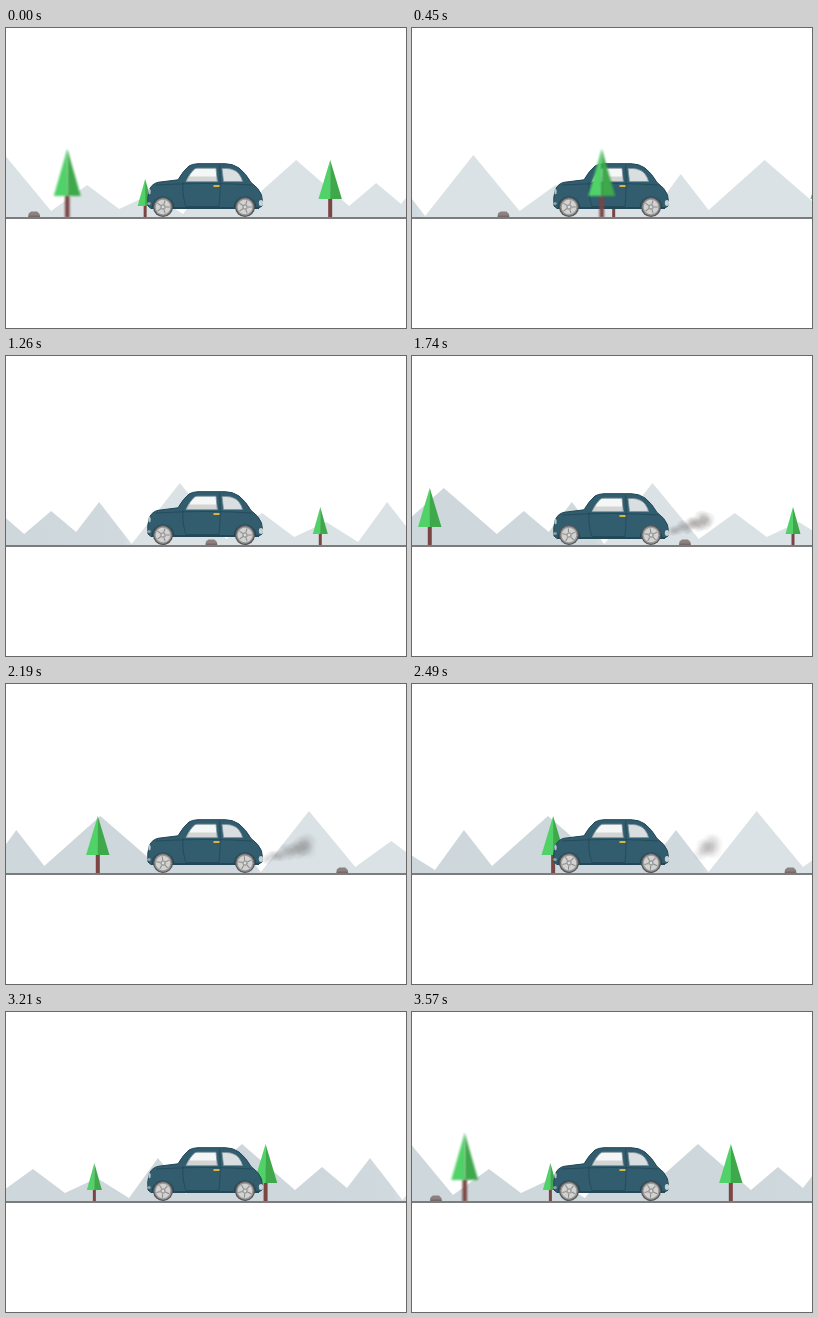
Write an HTML page with a canvas that moves like this. It is 400 px wide and 300 px high and loops after 3600 ms.

```html
<!DOCTYPE html>
<html lang="en">
<head>
<meta charset="utf-8">
<title>Little car on the road</title>
<style>
html, body { margin: 0; width: 100%; height: 100%; overflow: hidden; background: #fff; }
canvas { display: block; width: 400px; height: 300px; }
</style>
</head>
<body>
<canvas id="stage" width="400" height="300"></canvas>
<script>
const ctx = document.getElementById('stage').getContext('2d');
const LOOP = 3600, GROUND = 190, RANGE = 500;

// One repeating stretch of the mountain range
const ridge = [[-1.3, 127], [45, 183], [81, 157], [113, 181], [145, 166], [177, 186], [206, 146], [234, 182],
  [290, 132], [343, 178], [370, 155], [395, 176], [418, 146], [450.5, 188]];

const bodyShape = new Path2D(`M142 178 Q141 169 143 163 Q145 156 152 154.3 L172 151.8 Q177 143 183 138
  Q186 136 192 135.7 H219 Q227 135.7 233 140 Q240 145.5 245 154.5 Q253 160 255.5 167 Q257 173 256 178
  L252 180.5 H145 Z`);
const frontWindow = new Path2D('M180 153.5 Q184 145 188 141.5 Q189 140.3 192 140.2 H210 L211.3 153.5 Z');
const rearWindow = new Path2D('M216 140.5 H221 Q229 141 233 146 Q236 150 236.5 153.5 H217.5 Z');
const seams = new Path2D('M177 154 Q176 168 180 178.5 H213 Q215 160 213.5 137 M150 157 Q200 154 246 157');

function fill(shape, color) {
  ctx.fillStyle = color;
  ctx.fill(shape);
}

function polygon(color, ...points) {
  ctx.beginPath();
  points.forEach(([x, y]) => ctx.lineTo(x, y));
  ctx.fillStyle = color;
  ctx.fill();
}

function ellipse(x, y, rx, ry, color, start = 0, end = 2 * Math.PI) {
  ctx.beginPath();
  ctx.ellipse(x, y, rx, ry, 0, start, end);
  ctx.fillStyle = color;
  ctx.fill();
}

function mountains(t) {
  const shift = t / LOOP * RANGE;
  const shade = ctx.createLinearGradient(shift - 150, 0, shift - 20, 0);
  shade.addColorStop(0, '#ced7db');
  shade.addColorStop(0.7, '#d0d9dd');
  shade.addColorStop(0.8, '#dae2e6');
  const points = [-1, 0, 1].flatMap(i => ridge.map(([x, y]) => [x + i * RANGE + shift, y]));
  polygon(shade, [points[0][0], GROUND], ...points, [points.at(-1)[0], GROUND]);
}

function tree(x, top, base, half, trunk, blur) {
  ctx.filter = `blur(${blur}px)`;
  ctx.fillStyle = '#7a4543';
  ctx.fillRect(x - trunk / 2, base - 1, trunk, GROUND - base + 1);
  polygon('#50d268', [x, top], [x - half, base], [x + 0.5, base]);
  polygon('#3ea84b', [x, top], [x, base], [x + half, base]);
  ctx.filter = 'none';
}

function rock(x) {
  polygon('#8d807f', [x - 6, 189], [x - 5.5, 185.5], [x - 3, 183.5], [x + 3, 183.5], [x + 5.5, 186], [x + 6, 189]);
  ctx.fillStyle = '#75696a';
  ctx.fillRect(x - 5.5, 187.5, 11, 1.5);
}

function wheel(x, t) {
  ctx.save();
  ctx.translate(x, 179);
  ctx.rotate(-t / LOOP * 16 * Math.PI);
  ellipse(0, 0, 10, 10, '#56575a');
  ellipse(0, 0, 8.7, 8.7, '#979797');
  ellipse(0, 0, 7.3, 7.3, '#d2d2d0');
  ctx.strokeStyle = '#8a8a8a';
  ctx.lineWidth = 1;
  ctx.beginPath();
  for (let i = 0; i < 5; i++) {
    ctx.rotate(Math.PI * 0.4);
    ctx.moveTo(2.5, 0);
    ctx.lineTo(6.8, 0);
  }
  ctx.stroke();
  ellipse(0, 0, 2.7, 2.7, '#9c9c9c');
  ellipse(0, 0, 1.3, 1.3, '#dcdcdc');
  ctx.restore();
}

function car(t) {
  ctx.save();
  // The suspension sinks after the rock passes the rear wheel
  ctx.translate(0, 2 * Math.exp(-(((t - 1740) / 120) ** 2)));
  fill(bodyShape, '#315d6f');
  ctx.strokeStyle = '#234756';
  ctx.lineWidth = 1;
  ctx.stroke(bodyShape);
  ctx.lineWidth = 0.8;
  ctx.stroke(seams);
  ctx.fillStyle = '#234756';
  ctx.fillRect(146, 179, 107, 2);

  fill(frontWindow, '#f5f6f6');
  polygon('#d3d5d5', [180, 153.5], [182.5, 148.5], [210.8, 148.5], [211.3, 153.5]);
  fill(rearWindow, '#d9dee1');
  ctx.strokeStyle = '#7f939c';
  ctx.stroke(frontWindow);
  ctx.stroke(rearWindow);

  ctx.fillStyle = '#d8b53c';
  ctx.fillRect(207.5, 157, 6, 2);
  ellipse(143.5, 163.5, 1.2, 2.8, '#b9c4c6');
  ellipse(143, 175.5, 1.8, 1.5, '#8fa0a6');
  ellipse(255, 175, 2.2, 3, '#c9d2d5');
  ellipse(157, 180, 11.3, 11.5, '#234756', Math.PI);
  ellipse(239, 180, 11.3, 11.5, '#234756', Math.PI);
  ctx.restore();
  wheel(157, t);
  wheel(239, t);
}

function smoke(t) {
  for (let i = 0; i < 20; i++) {
    const age = (t - 1330 - i * 45) / 720;
    if (age <= 0 || age >= 1) continue;
    const travel = 1 - (1 - age) ** 2;
    const x = 260 + 43 * travel;
    const y = 175 - 14 * travel + 6 * Math.sin(i * 2.4) * Math.sqrt(age);
    const r = 6 + 5 * age;
    const puff = ctx.createRadialGradient(x, y, 0, x, y, r);
    const alpha = (0.38 - i * 0.008) * (1 - age * age);
    puff.addColorStop(0, `rgba(95, 90, 88, ${alpha})`);
    puff.addColorStop(1, 'rgba(95, 90, 88, 0)');
    ellipse(x, y, r, r * 0.85, puff);
  }
}

function draw(now) {
  const t = now % LOOP;
  ctx.fillStyle = '#fff';
  ctx.fillRect(0, 0, 400, 300);
  mountains(t);
  tree(t < 2200 ? 139 + 0.139 * t : 34 + 0.139 * (t - 2820), 151, 178, 7.5, 3, 0.4);
  tree(t < 900 ? 324 + 0.191 * t : 17.6 + 0.1645 * (t - 1740), 132, 171, 11.7, 4, 0.5);
  rock(28 + 0.1407 * (t < 3000 ? t : t - LOOP));
  car(t);
  smoke(t);
  tree(61 + 0.2855 * (t < 2000 ? t : t - LOOP), 121, 168, 13.5, 4.5, 1);

  ctx.fillStyle = '#fff';
  ctx.fillRect(0, GROUND, 400, 10);
  ctx.fillStyle = '#7c7c7c';
  ctx.fillRect(0, GROUND - 1, 400, 2);
  requestAnimationFrame(draw);
}
requestAnimationFrame(draw);
</script>
</body>
</html>
```
